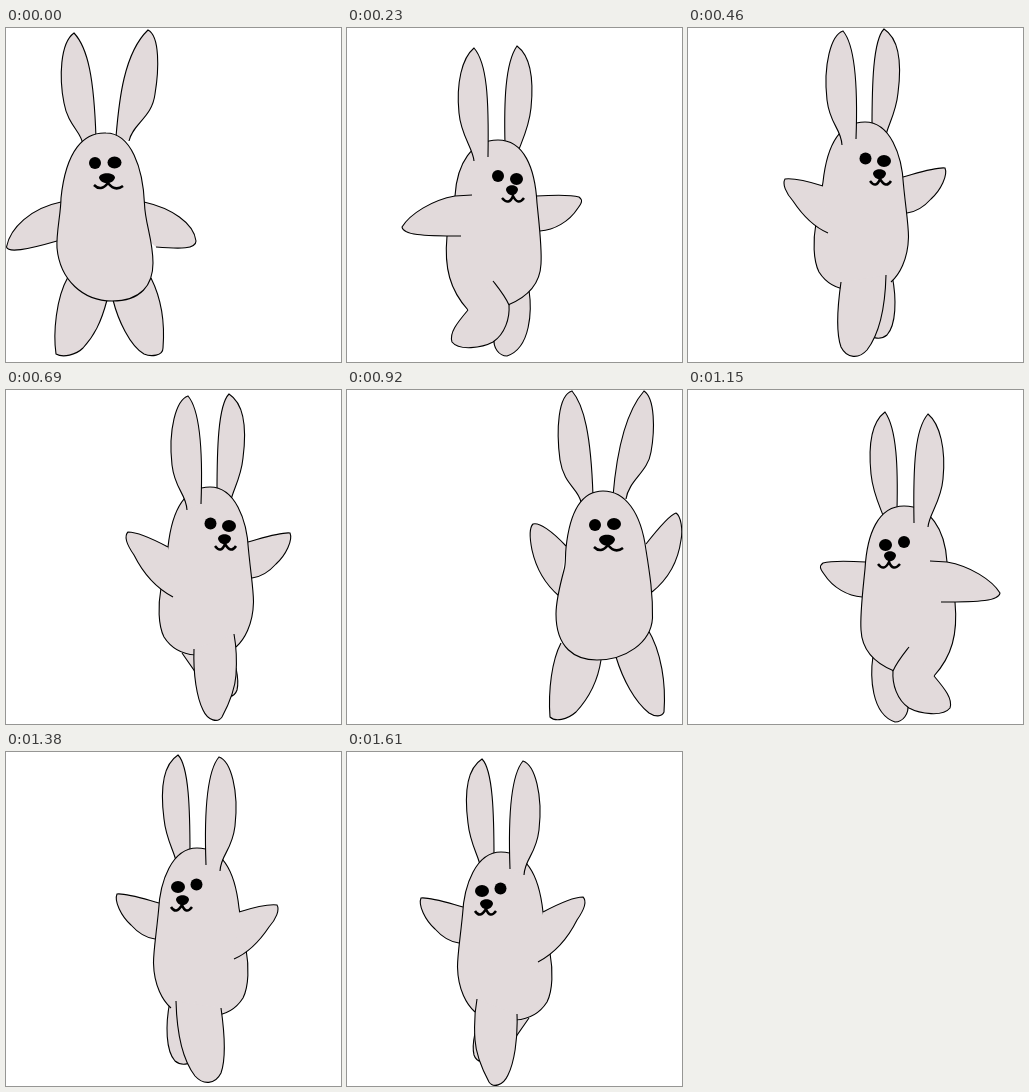
An HTML page with a canvas that plays this animation: 335x334 px, repeating every 1.84 s.

```html
<!DOCTYPE html>
<html lang="en">
<head>
<meta charset="utf-8">
<title>Dancing rabbit</title>
<style>
  html, body { margin: 0; width: 100%; height: 100%; overflow: hidden; background: #fff; }
  canvas { display: block; }
</style>
</head>
<body>
<canvas id="stage" width="335" height="334"></canvas>
<script>
const STEP = 230;
const ctx = document.getElementById('stage').getContext('2d');

// Parts are listed back to front; open ends merge into the body.
const armsDown = {
  parts: [
    'M62 249C50 270 47 305 50 326C57 330 70 327 77 320C88 308 95 295 101 272',
    'M107 272C112 292 124 318 138 326C145 329 157 328 157 320C159 295 155 270 145 250',
    'M55 174C25 180 4 200 0.5 219C2 225 20 222 51 213',
    'M134 205L138 174C165 180 188 195 190 213C190 221 175 221 150 219',
    'M77 117C76 104 62 98 58 75C53 50 54 15 68 5C82 20 88 50 90 110',
    'M110 109C113 72 118 25 142 2C154 8 153 42 149 66C146 90 127 95 123 113',
    'M100 105C78 104 60 122 55 170C55 185 50 205 51 220C54 252 77 273 106 273C135 273 147 257 147 235C147 212 139 195 138.5 176C137 140 125 105 100 105Z'
  ],
  eyes: [[89, 135, 6, 6], [108.5, 134.5, 7, 6]],
  nose: [101, 150, 8, 4.5],
  mouth: 'M88 157Q95 164 102 155Q109 164 117 158'
};

const crossStep = {
  parts: [
    'M182 262C185 282 184 320 160 328C152 328 146 320 147 310L165 270',
    'M189 168C205 167 222 166 232 169C236 172 235 175 231 180C222 194 207 202 193 203',
    'M158 116C157 75 158 35 170 18C186 30 186 60 184 80C182 100 174 115 171 124',
    'M161 277C178 270 193 258 194 236C195 220 193 205 190 175C188 140 177 112 151 112C125 112 110 135 108 168L100 208C97 240 103 262 121 282',
    'M127 133C126 120 114 108 112 85C109 55 115 30 127 20C140 35 142 70 141 129',
    'M125 167L108 168C85 172 63 186 55 199C56 207 75 208 114 208',
    'M121 282C110 295 102 305 105 314C112 323 135 320 146 314C158 306 163 290 162 277C158 268 153 262 146 253'
  ],
  eyes: [[151, 148, 6, 6], [169.5, 151, 6.5, 6]],
  nose: [165, 162, 6, 4.5],
  mouth: 'M155 170Q162 178 166 168Q171 178 177 170'
};

// Three-quarter view shared by the swing and the kick.
const turned = (farLeg, nearArm, nearLeg) => ({
  parts: [
    farLeg,
    'M242 152C260 147 275 142 284 143C287 150 280 165 270 174C262 183 254 187 246 188',
    'M211 103C211 60 212 15 223 4C240 15 240 45 237 68C235 88 227 100 225 110',
    'M189 265C175 264 165 258 158 247C152 235 152 215 155 198L162 157C166 120 178 97 204 97C229 97 241 130 242.5 160C245 185 247.5 200 247.5 212C247 235 238 250 230 257',
    'M181 120C180 103 169 100 166 75C162 40 170 10 182 6C194 20 197 60 195 114',
    nearArm,
    nearLeg
  ],
  eyes: [[204.5, 133.5, 6, 6], [223, 136, 7, 6]],
  nose: [218.5, 149, 6.5, 4.5],
  mouth: 'M209 156Q215 164 219 154Q225 164 230 156'
});

const swing = turned(
  'M231 250C236 275 235 300 226 310C220 315 212 314 205 308L205 255',
  'M162 161C146 156 132 153 124 154C121 159 125 168 132 176C142 191 153 202 167 208',
  'M180 257C176 285 175 308 180 322C186 334 198 334 206 325C216 312 224 290 225 250'
);

const kick = turned(
  'M176 263L190 283L223 307Q229 306 231 300Q233 292 230 278',
  'M162 157C145 148 130 142 122 142C118 146 121 155 128 165C138 185 150 198 167 207',
  'M188 259C187 285 191 308 197 320C202 331 212 333 216 327C224 312 229 300 230 285C231 270 230 255 228 244'
);

const armsUp = {
  parts: [
    'M214 253C205 270 201 300 203 327C208 332 220 330 229 322C242 308 251 290 254 270',
    'M269 267C276 290 288 312 302 323C308 327 315 327 317 322C319 295 315 262 300 238',
    'M219 156C205 141 192 132 186 134C182 138 183 150 185 160C189 178 198 194 212 206',
    'M299 154C310 140 322 125 329 123C334 126 336 140 334 150C331 172 320 190 305 202',
    'M234 112C231 98 217 95 213 70C209 40 211 5 225 1C237 15 244 45 246 106',
    'M266 106C269 70 276 25 297 1C308 8 308 40 304 62C301 82 282 90 279 109',
    'M256 101C236 101 223 120 219 158C218 168 219 174 217 180C213 195 209 210 209 224C209 258 228 270 250 270C278 270 304 253 305.5 228C306 205 303 185 299 160C294 122 278 101 256 101Z'
  ],
  eyes: [[248, 135, 6, 6], [267, 134, 7, 6]],
  nose: [260, 150, 8, 5],
  mouth: 'M247 157Q254 164 261 155Q268 164 276 158'
};

// [pose, x, y, direction]: the way back mirrors the way out.
const dance = [
  [armsDown, 0, 0, 1],
  [crossStep, 0, 0, 1],
  [swing, -27, -3, 1],
  [kick, 0, 0, 1],
  [armsUp, 0, 0, 1],
  [crossStep, 367, 4, -1],
  [swing, 395, -1, -1],
  [kick, 358, 3, -1]
];

function drawEye([x, y, rx, ry]) {
  ctx.beginPath();
  ctx.ellipse(x, y, rx, ry, 0, 0, Math.PI * 2);
  ctx.fill();
}

// Rounded on top, pointed below.
function drawNose([x, y, rx, ry]) {
  const top = y - ry * 1.4;
  ctx.beginPath();
  ctx.moveTo(x - rx, y);
  ctx.bezierCurveTo(x - rx, top, x + rx, top, x + rx, y);
  ctx.quadraticCurveTo(x + rx * 0.8, y + ry, x, y + ry + 1);
  ctx.quadraticCurveTo(x - rx * 0.8, y + ry, x - rx, y);
  ctx.fill();
}

function draw([pose, x, y, dir]) {
  ctx.setTransform(1, 0, 0, 1, 0, 0);
  ctx.fillStyle = '#fff';
  ctx.fillRect(0, 0, 335, 334);
  ctx.setTransform(dir, 0, 0, 1, x, y);

  ctx.fillStyle = '#e2dadb';
  ctx.strokeStyle = '#000';
  ctx.lineWidth = 1.1;
  for (const d of pose.parts) {
    const path = new Path2D(d);
    ctx.fill(path);
    ctx.stroke(path);
  }

  ctx.fillStyle = '#000';
  pose.eyes.forEach(drawEye);
  drawNose(pose.nose);
  ctx.lineWidth = 2.5;
  ctx.stroke(new Path2D(pose.mouth));
}

const start = performance.now();
function tick() {
  const step = Math.floor((performance.now() - start) / STEP);
  draw(dance[step % dance.length]);
  requestAnimationFrame(tick);
}
tick();
</script>
</body>
</html>
```
